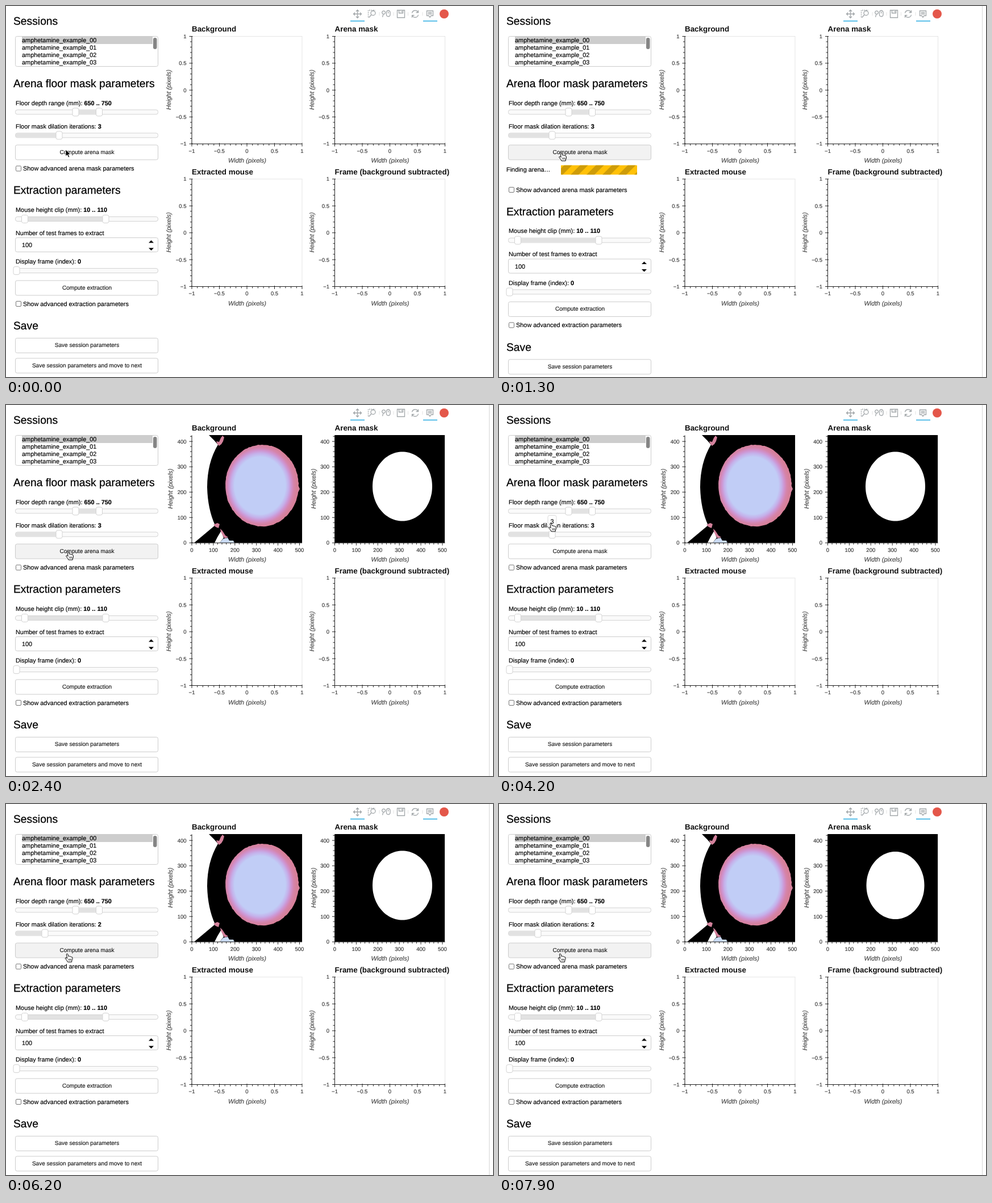
These frames come from a looping animation (857 by 654 pixels, 8 s). An HTML page:

```html
<!DOCTYPE html>
<html lang="en">
<head>
<meta charset="utf-8">
<title>Arena mask tool</title>
<style>
html, body { margin: 0; width: 100%; height: 100%; overflow: hidden; background: #fff; }
svg { display: block; width: 857px; height: 654px; font-family: "Liberation Sans", Arial, sans-serif; }
text { fill: #000; stroke: #000; stroke-width: .15px; font-size: 10.9px; text-rendering: geometricPrecision; white-space: pre; }
.head { font-size: 19.3px; stroke-width: .25px; }
.btn { font-size: 10.05px; fill: #222; text-anchor: middle; }
.title { font-size: 13.4px; font-weight: bold; fill: #111; stroke: none; }
.axis { font-size: 11.1px; font-style: italic; fill: #444; stroke: #444; text-anchor: middle; }
.tick { font-size: 9.5px; fill: #333; stroke: #333; }
.mid { text-anchor: middle; }
.end { text-anchor: end; }
.b { font-weight: bold; }
.box { fill: #fff; stroke: #ccc; }
.icon { fill: none; stroke: #a1a6a9; stroke-width: 1.3; }
</style>
</head>
<body>
<svg id="stage" viewBox="0 0 857 654"></svg>
<script>
const LOOP = 8000;
// Each run: button replaced by the bar, button back above the bar, finished.
const RUNS = [[700, 1250, 2390], [6400, 6950, 7090]];
const DRAG = 5000;
const PATH = [
  [0, 105, 253], [100, 105, 253], [400, 109, 258], [3850, 109, 258],
  [4200, 91, 208], [4400, 91, 212], [4750, 91, 224], [5200, 67, 225],
  [5550, 67, 225], [6100, 107.5, 263.5], [LOOP, 107.5, 263.5]
];
const X0 = 17, W = 251, STRIPE = 28;

const text = (x, y, s, cls = "", extra = "") => `<text x="${x}" y="${y}" class="${cls}" ${extra}>${s}</text>`;
const rect = (x, y, w, h, attrs) => `<rect x="${x}" y="${y}" width="${w}" height="${h}" ${attrs}/>`;
const path = (d, attrs) => `<path d="${d}" ${attrs}/>`;
const group = (id, body) => `<g id="${id}">${body}</g>`;
const label = (y, s, value = "") => text(X0, y, `${s}<tspan class="b">${value}</tspan>`);

const button = (y, s, id = "") =>
  rect(X0 - .5, y + .5, W, 26, `rx="3" class="box" id="${id}"`) + text(142.5, y + 16.3, s, "btn");

const check = (y, s) =>
  rect(17.5, y - 4.5, 9, 9, 'rx="1.5" fill="#fff" stroke="#767676"') + text(30, y + 3.5, s);

const handle = (x, y, id = "") =>
  rect(x - 5.5, y - 7, 11, 14, `id="${id}" rx="3" fill="#fff" stroke="#d3d3d3"`);

function slider(y, from, to, ids = ["", ""]) {
  return rect(X0 - .5, y - 4, W, 8, 'rx="3.5" fill="#fafafa" stroke="#d3d3d3"') +
    rect(from, y - 3.5, to - from, 7, `id="${ids[0]}" fill="#e2e2e2"`) +
    (from > X0 ? handle(from, y) : "") + handle(to, y, ids[1]);
}

// Axes with major ticks at start + k * step and five minor steps between.
function axes(x, y, start, step, spanX, spanY) {
  const w = 194, h = 189.5, bottom = y + h;
  let d = `M${x} ${y}V${bottom}H${x + w}`, out = "";
  const name = v => String(v).replace("-", "−");
  for (let k = 0; k * step / 5 <= spanX + 1e-6; k++) {
    const px = x + k * step / 5 / spanX * w, major = k % 5 === 0;
    d += `M${px} ${bottom + (major ? 4.5 : 3)}V${bottom - (major ? 1.5 : 0)}`;
    if (major) out += text(px, bottom + 15.6, name(start + k / 5 * step), "tick mid");
  }
  for (let k = 0; k * step / 5 <= spanY + 1e-6; k++) {
    const py = bottom - k * step / 5 / spanY * h, major = k % 5 === 0;
    d += `M${x - (major ? 4.5 : 3)} ${py}H${x + (major ? 1.5 : 0)}`;
    if (major) out += text(x - 9.5, py + 3.4, name(start + k / 5 * step), "tick end");
  }
  const lx = x - (start ? 37 : 34), ly = y + 94;
  return path(d, 'fill="none" stroke="#222" stroke-width="1"') + out +
    text(lx, ly, "Height (pixels)", "axis", `transform="rotate(-90 ${lx} ${ly})"`);
}

function frame(x, y, title) {
  return rect(x, y, 194, 189.5, 'fill="#fff" stroke="#e5e5e5"') +
    text(x, y - 8.4, title, "title") + text(x + 97.5, y + 222.5, "Width (pixels)", "axis");
}
const emptyAxes = (x, y) => axes(x, y, -1, .5, 2, 2);
const imageAxes = (x, y) => axes(x, y, 0, 100, 512, 424);

// Ellipse with a slightly ragged, repeatable edge.
function blob(cx, cy, rx, ry, rough) {
  let seed = 7, d = "";
  for (let i = 0; i < 120; i++) {
    seed = seed * 16807 % 2147483647;
    const a = i / 120 * Math.PI * 2, r = 1 + (seed / 2147483647 - .5) * rough;
    d += `${i ? "L" : "M"}${(cx + rx * r * Math.cos(a)).toFixed(1)} ${(cy + ry * r * Math.sin(a)).toFixed(1)}`;
  }
  return d + "Z";
}

function background() {
  const pink = 'fill="#d4829c"';
  return rect(327, 53, 194, 190, 'fill="#000"') +
    path("M327 53H357L366 62 373 70Q354 102 354 145 355 184 368 212L331 243H327Z", 'fill="#fff"') +
    path("M370 64L375 65 378 58 381 54 384 57 382 64 379 69 375 72 372 69Z", pink) +
    path("M365 211L372 208 376 210 374 217 369 215ZM377 218L381 222 386 230 391 233 385 235 379 228Z", pink) +
    path("M367 243L372 233 378 223 383 234 376 243Z", 'fill="#fff"') +
    path("M376 243L382 236 390 234 393 239 400 239 402 243Z", 'fill="#cbdcf5"') +
    path(blob(450.5, 142, 64.5, 72, .014), 'fill="url(#depth)"') +
    path("M513 139L517 148 513 156Z", pink);
}

function toolbar() {
  const icon = d => path(d, 'class="icon"');
  return icon("M611.5 14H625.5M618.5 7V21M616 9.5L618.5 7 621 9.5M616 18.5L618.5 21 621 18.5M614 11.5L611.5 14 614 16.5M623 11.5L625.5 14 623 16.5") +
    path("M637.5 20V7.5H650", 'class="icon" stroke-dasharray="2 1.5"') +
    icon("M650 12.5A4 4 0 1 1 642 12.5A4 4 0 1 1 650 12.5M643 15.5L638.5 20.5") +
    icon("M667.5 11.5A2.9 2.9 0 1 0 661.7 11.5A2.9 2.9 0 1 0 667.5 11.5M664 14.5L662.5 19.5M669.5 12Q669.5 8 672.7 8T676 12V15Q676 18.5 672.7 18.5T669.5 15ZM672.7 10V13") +
    icon("M688.5 7.5H701.5V20.5H688.5ZM691.5 7.5V12.5H698.5V7.5M696.5 9V11") +
    icon("M714.5 12.5A5.6 5.6 0 0 1 725 11M725.5 15.5A5.6 5.6 0 0 1 715 17M725.5 7.5V11.5H721.5M714.5 20.5V16.5H718.5") +
    icon("M740.5 8.5H751.5V17H748L746 20 744 17H740.5ZM742.5 11.5H749.5M742.5 14H749.5") +
    path("M657 11V17M682 11V17M707.5 11V17M733 11V17", 'stroke="#e2e2e2" fill="none"') +
    path("M606 26.5H631M734 26.5H759", 'stroke="#26aae1" stroke-width="1.5"') +
    '<circle cx="771" cy="14" r="8" fill="#e4574a"/>';
}

function sessions() {
  let out = text(13, 33, "Sessions", "head") + rect(16.5, 53.5, W, 53, 'rx="3" class="box"') +
    rect(28, 54, 230, 13, 'fill="#cdcdcd"') + rect(259, 56, 6.5, 20, 'rx="3.2" fill="#858585"');
  for (let i = 0; i < 4; i++) out += text(28, 64.2 + 13 * i, "amphetamine_example_0" + i);
  return out;
}

let stripes = "";
for (let i = -2; i < 7; i++) stripes += `M${i * STRIPE} 17h14l17 -17h-14Z`;

const lower = check(286.5, "Show advanced arena mask parameters") +
  text(13, 331, "Extraction parameters", "head") +
  label(362.5, "Mouse height clip (mm): ", "10 .. 110") + slider(375.5, 33, 175.5) +
  label(403.5, "Number of test frames to extract") +
  rect(16.5, 408.5, W, 25, 'rx="3" class="box"') + text(28, 425, "100") +
  path("M251 417.5L255.5 413 260 417.5ZM251 426.5L255.5 431 260 426.5Z", "") +
  label(454, "Display frame (index): ", "0") + slider(466.5, 17, 18.5) +
  button(483.5, "Compute extraction") + check(525, "Show advanced extraction parameters") +
  text(13, 570, "Save", "head") +
  button(585, "Save session parameters") + button(620.5, "Save session parameters and move to next");

const stage = document.getElementById("stage");
stage.innerHTML = `<defs>
  <radialGradient id="depth" gradientUnits="userSpaceOnUse" cx="0" cy="0" r="1" gradientTransform="translate(447 142) scale(64 72)">
    <stop offset=".7" stop-color="#c1cdf6"/><stop offset=".79" stop-color="#c5b0ea"/>
    <stop offset=".86" stop-color="#cf93cf"/><stop offset=".93" stop-color="#d584aa"/>
    <stop offset="1" stop-color="#d6809a"/>
  </radialGradient>
  <clipPath id="barClip">${rect(0, 0, 134, 17, 'rx="1"')}</clipPath></defs>` +
  rect(0, 0, 857, 654, 'fill="#fff"') + sessions() +
  text(13, 143, "Arena floor mask parameters", "head") +
  label(174.5, "Floor depth range (mm): ", "650 .. 750") + slider(187, 122.5, 164) +
  text(X0, 215.5, 'Floor mask dilation iterations: <tspan class="b" id="count">3</tspan>') +
  slider(228, 17, 93.5, ["fill", "knob"]) +
  group("compute", button(244.5, "Compute arena mask", "face")) +
  group("progress", text(13, 11.5, "Finding arena…") +
    `<g transform="translate(109 0)" clip-path="url(#barClip)">${rect(0, 0, 134, 17, 'fill="#ffc107"')}${path(stripes, 'id="stripes" fill="#ce9c08"')}</g>`) +
  group("lower", lower) + toolbar() +
  frame(327, 53.5, "Background") + frame(578.5, 53.5, "Arena mask") +
  frame(327, 305, "Extracted mouse") + frame(578.5, 305, "Frame (background subtracted)") +
  emptyAxes(327, 305) + emptyAxes(578.5, 305) +
  group("before", emptyAxes(327, 53.5) + emptyAxes(578.5, 53.5)) +
  group("after", background() + rect(578.5, 53, 193.5, 190, 'fill="#000"') +
    path("", 'id="mask" fill="#fff"') + imageAxes(327, 53.5) + imageAxes(578.5, 53.5)) +
  path("M850.5 0V654", 'id="edge" stroke="#d6d6d6"') +
  group("tip", rect(-7.5, 194.5, 15, 22, 'rx="3" fill="#fff" stroke="#d9d9d9"') + text(0, 209, "3", "mid", 'id="tipText"')) +
  group("arrow", path("M0 0V12L2.8 9.4 4.8 14 6.8 13.1 4.8 8.7H8.6Z", 'stroke="#fff" stroke-width=".8"')) +
  group("hand", path("M-1.2 1.2Q0 -.6 1.3 1.2L2.4 5Q4 4 5 5.4 6.6 4.7 7.3 6.2 9.2 5.7 9.5 7.8L9.3 11 8.2 13V15H1L-.3 12.4 -3.2 8.8Q-3.3 7 -1.5 7.4L.2 8.8Z", 'fill="#fff" stroke="#000" stroke-linejoin="round"') +
    path("M3 9.3V12.6M5 9.3V12.6M7 9.3V12.6", 'stroke="#000" stroke-width=".8"'));

const ui = {};
stage.querySelectorAll("[id]").forEach(el => { if (el.id) ui[el.id] = el; });
const show = (el, on) => el.setAttribute("display", on ? "inline" : "none");
const move = (el, x, y) => el.setAttribute("transform", `translate(${x} ${y})`);
const between = (t, a, b) => t >= a && t < b;

const MASKS = [blob(697.5, 143.5, 52.5, 61, 0), blob(697.5, 143.5, 51, 59.5, 0)];

function pointer(t) {
  let i = 1;
  while (i < PATH.length - 1 && t >= PATH[i][0]) i++;
  const [t0, x0, y0] = PATH[i - 1], [t1, x1, y1] = PATH[i];
  const p = (t - t0) / (t1 - t0), e = p * p * (3 - 2 * p);
  return [x0 + (x1 - x0) * e, y0 + (y1 - y0) * e];
}

function draw(t) {
  const run = RUNS.find(r => between(t, r[0], r[2]));
  const hidden = !!run && t < run[1];
  const hover = between(t, 200, 3950) || t >= 5850;
  const tip = between(t, 4100, 5600);

  show(ui.compute, !hidden);
  ui.face.style.fill = hover ? "#f2f2f2" : "#fff";
  show(ui.progress, !!run);
  move(ui.progress, 0, hidden ? 245 : 280.5);
  if (run) move(ui.stripes, (t - run[0]) / 1000 * STRIPE % STRIPE, 0);
  move(ui.lower, 0, !run ? 0 : hidden ? 2 : 37.5);

  const done = t >= RUNS[0][2];
  show(ui.before, !done);
  show(ui.after, done);
  ui.mask.setAttribute("d", MASKS[t < RUNS[1][2] ? 0 : 1]);
  show(ui.edge, t >= RUNS[0][0]);

  const value = t < DRAG ? 3 : 2, x = value === 3 ? 93.5 : 68.5;
  ui.count.textContent = ui.tipText.textContent = value;
  ui.knob.setAttribute("x", x - 5.5);
  ui.fill.setAttribute("width", x - X0);
  show(ui.tip, tip);
  move(ui.tip, x, 0);

  const hand = (hover && !hidden) || tip, [px, py] = pointer(t);
  show(ui.hand, hand);
  show(ui.arrow, !hand);
  move(hand ? ui.hand : ui.arrow, px, py);
}

const begin = performance.now();
function tick() {
  draw((performance.now() - begin) % LOOP);
  requestAnimationFrame(tick);
}
draw(0);
requestAnimationFrame(tick);
</script>
</body>
</html>
```
